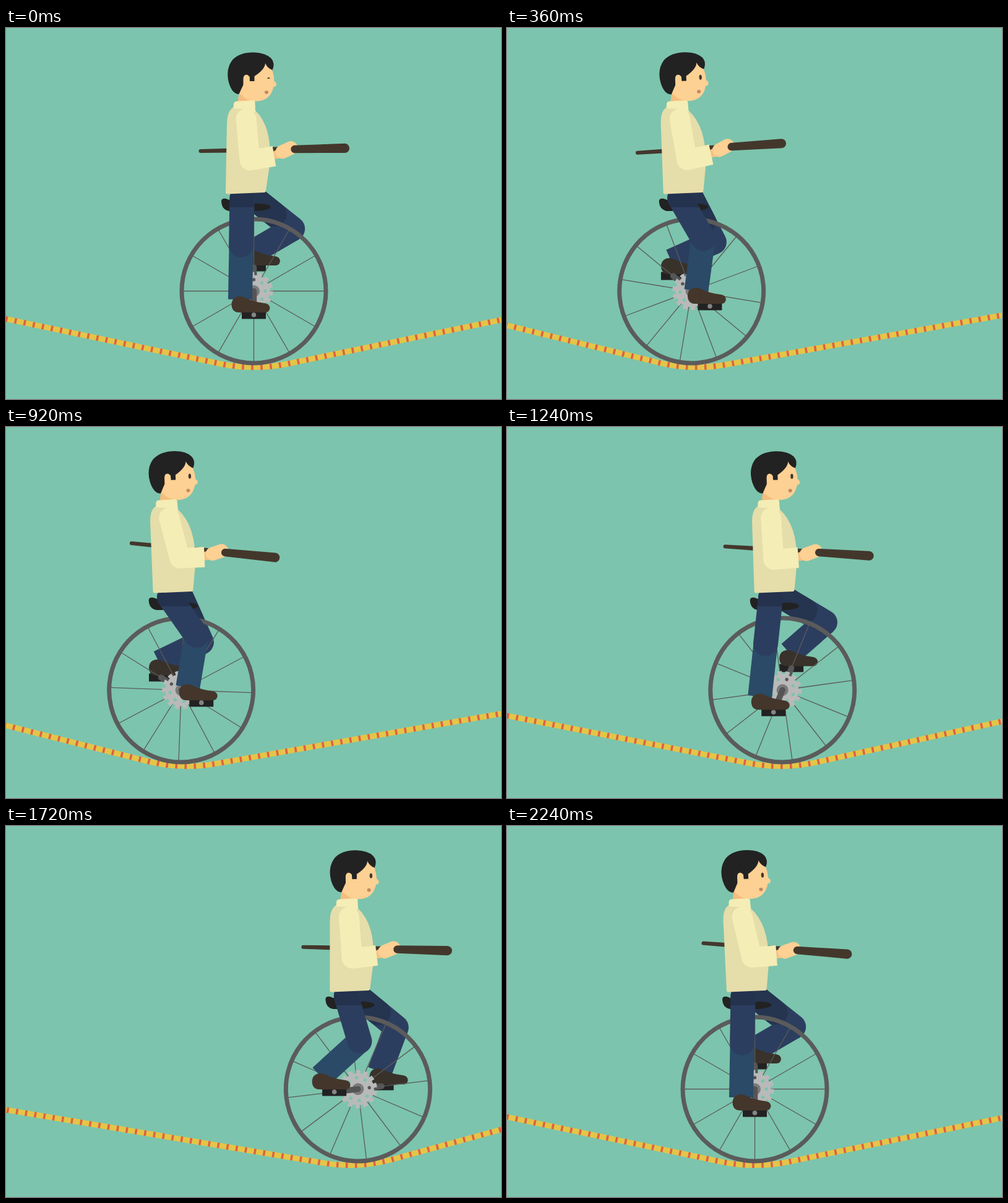
Recreate the animation shown at these times as an HTML page. Size 800x600 px, loop 2280 ms.

```html
<!DOCTYPE html>
<html lang="en">
<head>
<meta charset="utf-8">
<title>Unicycle on a rope</title>
<style>
html, body { margin: 0; width: 100%; height: 100%; overflow: hidden; background: #7cc4ad; }
svg { display: block; width: 100vw; height: 100vh; }
.line { fill: none; stroke-linejoin: round; }
.round { stroke-linecap: round; }
</style>
</head>
<body>
<svg viewBox="0 0 800 600">
  <defs>
    <path id="shoe" d="M-23-30Q-36-29-36-16Q-35-4-24-4L19-4Q26-5 26-12Q25-18 17-19Q-3-22-12-27Q-17-30-23-30Z"/>
    <clipPath id="shade"><rect x="-100" y="240" width="200" height="50"/></clipPath>
  </defs>
  <rect width="800" height="600" fill="#7cc4ad"/>
  <path id="rope" class="line" stroke="#e3c548" stroke-width="9"/>
  <path id="marks" class="line" stroke="#dc6148" stroke-width="9" stroke-dasharray="3.6 11.4" stroke-dashoffset="-10"/>

  <g id="rider">
    <path id="farShin" class="line" stroke="#2c3e5f" stroke-width="40"/>
    <path id="farThigh" class="line round" stroke="#2c3e5f" stroke-width="40"/>
    <path id="farShade" class="line round" stroke="#25344f" stroke-width="40"/>
    <g id="farFoot">
      <rect x="-19.5" y="-6.5" width="39" height="13" fill="#222"/>
      <use href="#shoe" x="16.5" y="1" fill="#38322b"/>
    </g>
    <path fill="#222" d="M-52.500 280Q-52 275-45 276Q-25 284 10 284Q27 285 27 290Q23 295 4 296L-40 296Q-52 294-52.500 280Z"/>
    <g id="wheel">
      <path class="line round" d="M0 0V-38.500" stroke="#555" stroke-width="9.500"/>
      <g id="spokes" stroke="#5b5b5b" stroke-width="1.3"></g>
      <circle r="116.500" class="line" stroke="#5b5b5b" stroke-width="7"/>
      <circle r="26" fill="#b9b9b9"/>
      <circle r="28" class="line" stroke="#b9b9b9" stroke-width="6" pathLength="140" stroke-dasharray="5.6 4.4"/>
      <g id="holes"></g>
      <circle r="9.500" fill="#7b7b7b"/>
      <path class="line round" d="M0 0V38.500" stroke="#555" stroke-width="9.500"/>
    </g>
    <path id="shin" class="line" stroke="#2b4a67" stroke-width="39"/>
    <path id="thigh" class="line round" stroke="#2c3e5f" stroke-width="40"/>
    <g clip-path="url(#shade)"><path id="thighShade" class="line round" stroke="#24324e" stroke-width="40"/></g>
    <g id="foot">
      <rect x="-19.500" y="-5" width="39" height="11.500" fill="#222"/>
      <circle r="3.800" fill="#858585"/>
      <use href="#shoe" fill="#44362b"/>
    </g>

    <path id="pole" fill="#43372c"/>
    <g id="torso">
      <path fill="#e5ddaa" d="M-30 127Q-43 131-43.500 155L-45.500 266Q-45.500 268.500-43 268.500L17 266Q19 266 19.500 263L25.500 222Q28 190 22 168Q16 146 2 133Q-14 122-30 127Z"/>
    </g>
    <g id="head">
      <path fill="#f5bd7c" d="M-23 100L-26 120L0 122L4 105Z"/>
      <path fill="#fdd093" d="M-16 76L0 55L22 52Q33 70 33 86Q37 88 36.500 92Q35.500 95.500 32 95Q27 118 4 118.500Q-12 118-20 108L-24 106Z"/>
      <path fill="#222" d="M-24 107Q-35 107-40.500 88Q-46 66-34 51Q-22 39 0 39.500Q19 40 28 49Q35 57 30 68Q22 65 18.500 57Q18 67 1 78L1 86L-6.500 86L-7 78L-12 82L-16 90Q-20 98-24 107Z"/>
      <path fill="#fdd093" d="M-17 83Q-17 75.500-12 75.500Q-7 76-7 82L-8 92L-17 94Z"/>
      <ellipse id="eye" cx="24" cy="81" rx="2.200" fill="#43372c"/>
      <ellipse cx="20.500" cy="104" rx="3" ry="2.800" fill="#bf8a64"/>
    </g>
    <g id="collar">
      <path fill="#f4edb5" d="M-32.500 123Q-32 119-28 118.500L-1 117Q2 117 2 120L2.500 136L-14 131L-33 130Z"/>
    </g>
    <g id="hand">
      <path class="line round" d="M-30 9L-22 6" stroke="#f5c083" stroke-width="14"/>
      <path class="line round" d="M-20 4.500L-6-2" stroke="#fdd093" stroke-width="22"/>
    </g>
    <path id="sleeve" class="line" stroke="#f4edb5" stroke-width="33"/>
    <circle id="shoulder" r="16.500" fill="#f4edb5"/>
    <path id="poleFront" fill="#43372c"/>
  </g>
</svg>
<script>
const $ = id => document.getElementById(id);
const set = (id, name, value) => $(id).setAttribute(name, value);
const LOOP = 2280, STEP = 40, HUB_Y = 425.5, CRANK = 38.5;
const DEG = 180 / Math.PI;

// Each key: time, value(s); eased in and out between keys.
const travelKeys = [[0, 0], [657, -179], [1648, 175.5], [2240, 0]];
// lean, grip x, grip y, pole tilt in degrees
const poseKeys = [
  [0, 0, 66, 196, -1.1],
  [360, -.054, 64.5, 192, -3.7],
  [920, -.058, 71, 203, 5.7],
  [1240, -.05, 59, 203, 3.7],
  [1520, .01, 61, 201, 2.2],
  [1920, -.044, 66, 198, .7],
  [2240, -.066, 68.5, 201, 4.3]
];

function sample(keys, t) {
  let i = 0;
  while (i < keys.length - 2 && t >= keys[i + 1][0]) i++;
  const a = keys[i], b = keys[i + 1];
  const p = Math.min(1, (t - a[0]) / (b[0] - a[0]));
  const s = p * p * (3 - 2 * p);
  return a.slice(1).map((v, k) => v + (b[k + 1] - v) * s);
}

const mix = (a, b, p) => [a[0] + (b[0] - a[0]) * p, a[1] + (b[1] - a[1]) * p];
const poly = (...points) => 'M' + points.map(p => p.map(v => v.toFixed(2)).join(' ')).join('L');
const move = p => `translate(${p[0]} ${p[1]})`;

// Middle joint of a two-part limb; side is the direction of the bend.
function joint(a, b, upper, lower, side) {
  const dx = b[0] - a[0], dy = b[1] - a[1], d = Math.hypot(dx, dy);
  const c = (upper * upper + d * d - lower * lower) / (2 * upper * d);
  const angle = Math.atan2(dy, dx) + side * Math.acos(Math.max(-1, Math.min(1, c)));
  return [a[0] + upper * Math.cos(angle), a[1] + upper * Math.sin(angle)];
}

function taper(x1, r1, x2, r2) {
  return `M${x1} ${-r1}L${x2} ${-r2}A${r2} ${r2} 0 0 1 ${x2} ${r2}L${x1} ${r1}A${r1} ${r1} 0 0 1 ${x1} ${-r1}Z`;
}

function drawRope(x) {
  const left = [-275, 413], right = [1077, 415], dip = [x, 554.3];
  const toward = end => mix(dip, end, 55 / Math.abs(end[0] - x));
  const d = `${poly(left, toward(left))}Q${dip} ${toward(right)}L${right}`;
  set('rope', 'd', d);
  set('marks', 'd', d);
}

function drawLegs(turn) {
  const cx = -CRANK * Math.sin(turn), cy = CRANK * Math.cos(turn);
  const near = [cx, HUB_Y + cy], far = [-cx, HUB_Y - cy];

  const hip = [-19, 275], ankle = [near[0] - 22, near[1] - 25];
  const knee = joint(hip, ankle, 76, 85, -1);
  set('thigh', 'd', poly(hip, knee));
  set('thighShade', 'd', poly(hip, knee));
  set('shin', 'd', poly(knee, ankle));
  set('foot', 'transform', move(near));

  const farHip = [0, 275], farAnkle = [far[0] - 3, far[1] - 24];
  const farKnee = joint(farHip, farAnkle, 80, 76, -1);
  set('farThigh', 'd', poly(farHip, farKnee));
  set('farShade', 'd', poly(farHip, mix(farHip, farKnee, .53)));
  set('farShin', 'd', poly(farKnee, farAnkle));
  set('farFoot', 'transform', move(far));
}

function drawUpperBody(t) {
  const [lean, gripX, gripY, tilt] = sample(poseKeys, t);
  const shift = y => lean * (267 - y);
  const skew = `matrix(1 0 ${-lean} 1 ${267 * lean} 0)`;
  set('torso', 'transform', skew);
  set('collar', 'transform', skew);
  set('head', 'transform', `translate(${shift(118)} 0) rotate(${lean * 40} -11 118)`);
  set('eye', 'ry', t < 80 ? .9 : Math.min(4, 1 + (t - 40) / 27));

  const grip = [gripX, gripY], shoulder = [-12.5 + shift(147), 147];
  const wrist = [gripX - 2, gripY + 6];
  const elbow = joint(shoulder, wrist, 67.3, 71.5, 1);
  set('sleeve', 'd', poly(shoulder, elbow, mix(elbow, wrist, .56)));
  set('shoulder', 'transform', move(shoulder));
  set('hand', 'transform', `${move(grip)} rotate(${tilt + 1.1})`);
  for (const id of ['pole', 'poleFront']) set(id, 'transform', `${move(grip)} rotate(${tilt})`);
}

function draw(t) {
  const [travel] = sample(travelKeys, t);
  const x = 400.5 + travel, turn = travel / 116;
  drawRope(x);
  set('rider', 'transform', move([x, 0]));
  set('wheel', 'transform', `translate(0 ${HUB_Y}) rotate(${turn * DEG})`);
  drawLegs(turn);
  drawUpperBody(t);
}

function build() {
  let spokes = '', holes = '';
  for (let a = 0; a < 360; a += 30) spokes += `<path d="M0 0H114" transform="rotate(${a})"/>`;
  for (let a = 0; a < 360; a += 45) {
    holes += `<circle cx="18.5" r="2.7" fill="${a === 270 ? '#555' : '#7cc4ad'}" transform="rotate(${a})"/>`;
  }
  $('spokes').innerHTML = spokes;
  $('holes').innerHTML = holes;
  set('pole', 'd', taper(-152, 3, 0, 4.5));
  set('poleFront', 'd', taper(0, 6.2, 81, 7.6));
}

build();
const start = performance.now();
function tick() {
  const t = (performance.now() - start) % LOOP;
  draw(Math.floor(t / STEP) * STEP);
  requestAnimationFrame(tick);
}
tick();
</script>
</body>
</html>
```
